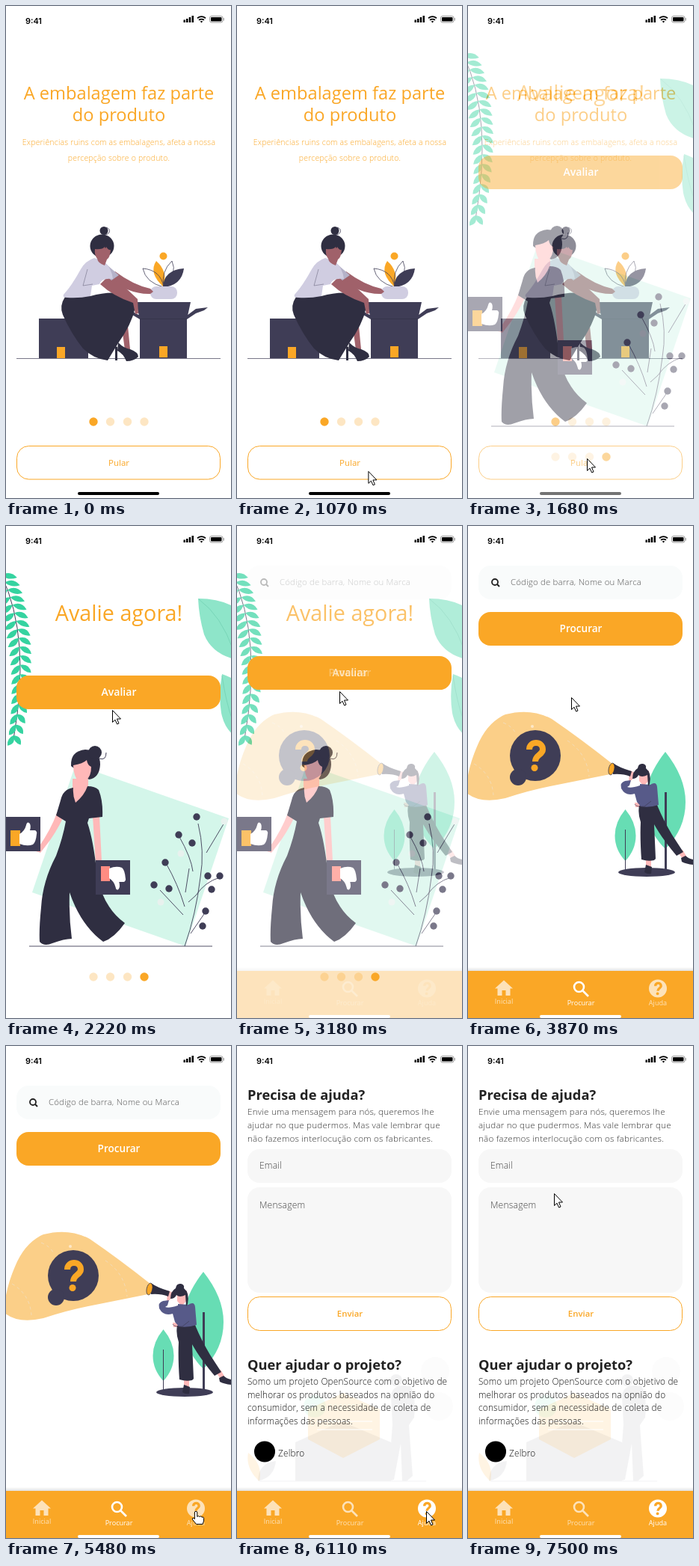
Write an HTML page that moves like this. It is 301 px wide and 658 px high and loops after 8 s.

```html
<!DOCTYPE html>
<html lang="pt">
<head>
<meta charset="utf-8">
<title>Embalagens</title>
<style>
  html, body { margin: 0; width: 100%; height: 100%; overflow: hidden; background: #fff; }
  svg { display: block; width: 100vw; height: 100vh; font-family: "Open Sans", "Noto Sans", sans-serif; }
  .mid { text-anchor: middle; }
  .light { font-weight: 300; letter-spacing: .18px; }
  .head { font-weight: 700; font-size: 18.3px; fill: #222; }
  .orange { fill: #faa726; }
  .dark { fill: #3f3d56; }
  .night { fill: #2f2e41; }
  .lilac { fill: #d0cde1; }
  .brown { fill: #a0616a; }
  .pink { fill: #ffb8b8; }
  .teal { fill: #67ddb4; }
  .line { fill: none; stroke: #3f3d56; }
</style>
</head>
<body>
<svg viewBox="0 0 301 658" preserveAspectRatio="none">
  <defs>
    <path id="thumb" d="M0 10Q7 6 9-2q1-5 4-3 3 3 1 10h7q3 2 2 5-1 11-5 14-8 3-18-1Z" fill="#fff"/>
    <g id="ask" fill="none" stroke-linecap="round">
      <path d="M-8-8C-8-20 10-20 10-8 10-1 0-1 0 8" stroke-width="8" stroke-linecap="butt"/>
      <path d="M-1 16.5h.01" stroke-width="9"/>
    </g>
    <linearGradient id="shade" x2="0" y2="1">
      <stop stop-color="#000" stop-opacity="0"/><stop offset="1" stop-color="#000" stop-opacity=".12"/>
    </linearGradient>
  </defs>

  <g id="intro">
    <g class="orange mid">
      <g font-size="23.65"><text x="151" y="125">A embalagem faz parte</text><text x="151" y="154">do produto</text></g>
      <g class="light" font-size="10.5">
        <text x="151" y="186">Experiências ruins com as embalagens, afeta a nossa</text>
        <text x="151" y="207">percepção sobre o produto.</text>
      </g>
      <text x="151" y="615" font-size="11.5">Pular</text>
    </g>
    <rect x="14.5" y="588.5" width="272" height="44.500" rx="16" fill="none" stroke="#faa726"/>
    <rect x="96" y="650" width="109" height="4" rx="2"/>
    <path class="line" d="M14 471.500H287" stroke-opacity=".7"/>
    <path class="dark" d="M44 418h66v53H44ZM179 418h63v53h-63ZM174 396h73l-5 23h-63ZM152 403l9 1 18 10v5ZM242 414l12-9 16-2-5 4-11 4-12 8Z"/>
    <path d="M179 418.500h63" stroke="#2f2e41" stroke-opacity=".5"/>
    <path class="orange" d="M68 456h11v15H68ZM205 455h11v15h-11Z"/>
    <path class="orange" d="M211 376Q190 357 201 341 217 355 211 376Z"/>
    <path class="dark" d="M210 376Q211 353 238 351 235 374 210 376Z"/>
    <path class="line" stroke-width=".8" d="M211 376Q187 370 183 351 207 353 211 376ZM211 376Q207 355 222 341 230 358 211 376Z"/>
    <rect class="lilac" x="193" y="375" width="36" height="17" rx="8"/>
    <circle class="orange" cx="210.500" cy="334.500" r="5"/>
    <path class="brown" d="M155 430l8-2 3 31-7 1ZM134 362l12-7Q170 373 193 378l4 4-4 3Q164 386 134 362Z"/>
    <path class="night" d="M146 455l3 1v18h-3ZM150 450q8 8 16 9 11 4 11 10-6 6-16 6-4-10-12-14ZM79 389Q95 386 113 388 140 380 164 386 176 392 173 403 168 426 150 451L136 474Q117 472 103 458 87 438 76 413 71 401 79 389Z"/>
    <path class="brown" d="M126 372l9-9q13 4 24 13l17 16 1 19-4 1-3-15Q143 388 126 372Z"/>
    <path d="M128 340l23 20-10 7-14-12Z" fill="#b5b2c9"/>
    <path class="lilac" d="M118 337Q106 341 100 352 88 374 77 386q-2 4 5 4 16 1 31-2l2-14 10-2q3-9 18-7Q141 349 130 341Z"/>
    <path d="M109 352l-6 22 13-2" class="line" stroke-width=".4"/>
    <circle class="night" cx="131" cy="300.500" r="5.500"/>
    <path class="line" stroke-width=".8" d="M134 296q6 2 4 7-2 3-6 3"/>
    <ellipse class="night" cx="128.500" cy="321" rx="16" ry="15.500"/>
    <path class="brown" d="M119 325q10 1 13-3 1 4 2 0 3 5 6 4-1 11-5 13l-3 8q-9-3-10-9-4-5-3-13Z"/>
    <g class="orange"><circle cx="117" cy="556" r="5.700"/>
      <g opacity=".27"><circle cx="139.500" cy="556" r="5.700"/><circle cx="162.500" cy="556" r="5.700"/><circle cx="185" cy="556" r="5.700"/></g></g>
  </g>

  <g id="rate">
    <rect width="301" height="658" fill="#fff"/>
    <text class="mid orange" x="151" y="127" font-size="28.700">Avalie agora!</text>
    <g id="fern" fill="#35d3a0"><path class="line" d="M-6 66Q34 150 10 285"/></g>
    <g fill="#8ee5c9">
      <path d="M257 97q28 0 48 11v70q-30-8-40-33-7-24-8-48ZM289 198q-5 27-1 52 4 20 17 30v-75q-10-5-16-7Z"/>
      <path d="M258 98q30 22 46 68M289 200q5 35 14 60" fill="none" stroke="#6fcfb0" stroke-width=".7"/>
    </g>
    <path class="teal" opacity=".28" d="M35 490L93 319 298 391 240 562Z"/>
    <path class="line" d="M31 562H276M239 562Q254 520 260 470 266 435 257 398M231 414q17 30 19 48M245 458l-5 32M214 451q16 28 25 58M206 487l31 33M267 516l-20 29M286 470q-20 6-32 24l-10 9M292 397l-24 40" stroke-width=".9"/>
    <g class="dark" id="berries"></g>
    <path class="pink" d="M68 384l9 5Q66 412 53 428l-7 9-6-2 4-6Q60 406 68 384ZM116 388h9l3 60q-4 8-8 3ZM89 338h21v16l-17 30-12-30 8-4Z"/>
    <g class="night">
      <path d="M90 350Q76 352 73 367l-6 20 13 8q-4 22-13 46Q49 475 47 510q-3 30-2 46 6 7 17 2 16-6 26-6-4-30-3-62 15 44 45 66 15-5 29-25Q130 510 122 468 117 420 109 397l2-6 18-2q1-21-5-36-5-5-15-5-4 12-16 22-4-10-3-20Z"/>
      <path d="M87 321Q86 301 106 299q20 1 20 20-1 18-15 20Z"/><circle cx="119" cy="303" r="9"/>
    </g>
    <path class="line" d="M125 311q9 3 9-8"/>
    <path class="pink" d="M90 320q13-2 18-7 1 7 6 9 0 13-7 18l-9 4q-8-10-8-24Z"/>
    <path class="dark" d="M0 389h46v46H0ZM120 447h46v46h-46Z"/>
    <path class="orange" d="M6 407h13v21H6Z"/><path d="M127 455h12v20h-12Z" fill="#ff8c82"/>
    <use href="#thumb" x="18" y="402"/><use href="#thumb" transform="translate(138 481) scale(.95 -1)"/>
    <g class="orange"><circle cx="185" cy="603" r="5.700"/>
      <g opacity=".27"><circle cx="117" cy="603" r="5.700"/><circle cx="139.500" cy="603" r="5.700"/><circle cx="162.500" cy="603" r="5.700"/></g></g>
  </g>

  <g id="search">
    <rect width="301" height="658" fill="#fff"/>
    <rect x="14" y="53" width="273" height="45" rx="16" fill="#f9fbfb"/>
    <path d="M39 78l3 3" stroke="#222" stroke-width="2"/><circle cx="36" cy="75" r="4" fill="none" stroke="#222" stroke-width="1.800"/>
    <text class="light" x="57" y="79" font-size="11.400" fill="#555">Código de barra, Nome ou Marca</text>
    <path d="M193 318Q150 284 112 258 84 243 50 252 25 263 12 295-1 325-3 356 15 372 50 364 80 354 110 348L190 332Z" fill="#fbcf88"/>
    <path d="M8 318q24 14 26 42M133 287q26 17 29 48M47 263q12 5 16 13" fill="none" stroke="#f3dcb8" stroke-dasharray="4 4"/>
    <circle cx="86" cy="268" r="2" fill="#fde8c8"/>
    <circle class="dark" cx="90" cy="307" r="34"/><circle class="dark" cx="67" cy="336" r="11"/>
    <use href="#ask" x="90" y="307" stroke="#faa726"/>
    <path class="teal" d="M264 302q27 34 27 67 0 36-27 63-27-27-27-63 0-33 27-67ZM210.500 379q14 17 14 35 0 19-14 34-14-15-14-34 0-18 14-35Z"/>
    <ellipse class="dark" cx="239" cy="463" rx="38" ry="6"/>
    <path class="line" stroke-width="3" d="M264.500 356V461"/><path class="line" d="M210.500 406V461"/>
    <path class="pink" d="M238 444h7v12h-7ZM281 437l6-4 6 10-5 3ZM216 327l6 2-2 10-5 3ZM223 370l14 1v5h-13ZM229 331q10-2 13-4l1 12-8 9-6-7Z"/>
    <path class="night" d="M229 374l24-1q7 18 20 40l15 23-9 5q-20-24-30-42l2 46-2 2q-8 2-17-1-2-29-1-50-4-12-2-22ZM238 453l8 3-1 9q-5 1-9-2ZM285 444l6-3q4 4 10 5v7q-9-1-15-4Z"/>
    <path d="M230 345l14 1q8-5 9 3l2 24q-12 4-24 2l-5-6-3-11q-12 4-18-7-2-8 5-10l8-1-2 7-3 2q5 2 17-2Z" fill="#575a89"/>
    <path d="M223 372q2 4 13 3l9-7" class="line" stroke-width=".7"/>
    <path class="night" d="M220 338q0-10 7-14 1-7 7-6 5 1 4 6 8 6 5 21l-2 3-1-15q-8 4-12 0-2 5-8 5Z"/>
    <path class="night" d="M194 317q8 6 25 11l-2 7q-10-4-23-3Z"/>
    <ellipse class="orange" cx="192" cy="325" rx="3.800" ry="8" transform="rotate(12 192 325)" stroke="#2f2e41" stroke-width=".7"/>
    <g class="bar"></g>
  </g>

  <g id="button">
    <rect class="orange" x="14" width="273" height="45" rx="16"/>
    <g class="mid" fill="#fff" font-weight="600">
      <text id="rateLabel" x="151" y="27" font-size="14">Avaliar</text>
      <text id="searchLabel" x="151" y="27" font-size="13.600">Procurar</text>
    </g>
  </g>

  <g id="help">
    <rect width="301" height="658" fill="#fff"/>
    <g opacity=".055">
      <path class="night" d="M78 530l62-28 66 28v52H78ZM206 470q0-14 14-16l12 1q8 10 5 42l-7 10 5 68-8 7h-6l-2-50-9 48-8 2 6-76Z"/>
      <circle class="night" cx="213" cy="447" r="8"/>
      <circle cx="265" cy="435" r="19" fill="#ccc"/><circle cx="270" cy="482" r="19" fill="#ccc"/>
      <path class="line" d="M30 582H253"/>
      <path class="night" d="M28 582q0-24 24-27-2 22-24 27Z"/>
    </g>
    <circle class="teal" cx="104" cy="482" r="15" opacity=".1"/>
    <path class="orange" opacity=".13" d="M95 486l47-22 49 22v40l-49 25-47-25ZM30 582q-19-17-15-38 20 15 15 38Z"/>
    <path d="M107 502h74M107 513h74" stroke="#fff" stroke-width="2" opacity=".6"/>
    <text class="head" x="14" y="72">Precisa de ajuda?</text>
    <g class="light" font-size="11.700" fill="#333">
      <text x="14" y="92">Envie uma mensagem para nós, queremos lhe</text>
      <text x="14" y="110">ajudar no que pudermos. Mas vale lembrar que</text>
      <text x="14" y="128">não fazemos interlocução com os fabricantes.</text>
    </g>
    <rect x="14" y="138" width="273" height="45" rx="16" fill="#f7f7f7"/>
    <rect x="14" y="189" width="273" height="141" rx="16" fill="#f7f7f7"/>
    <g class="light" font-size="12.100" fill="#444"><text x="30" y="164">Email</text><text x="30" y="217">Mensagem</text></g>
    <rect x="14.5" y="335.500" width="272" height="45" rx="16" fill="#fff" stroke="#faa726"/>
    <text class="mid orange" x="151" y="362" font-size="11.400" font-weight="600">Enviar</text>
    <text class="head" x="14" y="433">Quer ajudar o projeto?</text>
    <g class="light" font-size="11.800" fill="#111">
      <text x="14" y="453">Somo um projeto OpenSource com o objetivo de</text>
      <text x="14" y="471">melhorar os produtos baseados na opnião do</text>
      <text x="14" y="488">consumidor, sem a necessidade de coleta de</text>
      <text x="14" y="506">informações das pessoas.</text>
      <text x="55" y="549">Zelbro</text>
    </g>
    <circle cx="37" cy="542.500" r="14"/>
    <g class="bar"></g>
  </g>

  <g id="status">
    <text x="26" y="23.500" font-size="10.900" font-weight="600" style="font-family:Inter,sans-serif">9:41</text>
    <path d="M237.500 18.500h2.500V22h-2.500ZM241 17h2.500v5H241ZM244.700 15h2.500v7h-2.500ZM248.500 13h2.500v9h-2.500Z"/>
    <path d="M256 16.200q5.500-4 11 0M258 18.800q3.500-2.500 7 0" fill="none" stroke="#000" stroke-width="1.800"/><path d="M259.700 20.500q1.800-1.200 3.600 0L261.500 22.500Z"/>
    <rect x="272.500" y="13.500" width="17.500" height="8.500" rx="2.500" fill="none" stroke="#999"/><rect x="274" y="15" width="14.500" height="5.500" rx="1"/>
    <path d="M291.300 16v3.500" stroke="#999"/>
  </g>

  <g id="cursor" fill="#fff" stroke="#000" stroke-linejoin="round">
    <path id="arrow" d="M.5.500V16.500L4 13.200 6.600 19 9 18 6.500 12H11.500Z"/>
    <path id="hand" d="M-1.700 2a1.700 1.700 0 0 1 3.400 0V7.500l1.500-1 1.600 1 1.700-.6 1.500 1.300 1.500-.3 1 1.600V13L9 17.500H.5L-4.500 11.500q-.8-2.300 1.300-2.300l1.500 1.400Z"/>
  </g>
</svg>
<script>
const $ = id => document.getElementById(id);
const show = (id, opacity) => $(id).setAttribute('opacity', opacity);

// Leaflets in pairs along the curved stem.
for (let i = 0; i < 19; i++) {
  const s = i / 18, r = 1 - s, length = 21 - 5 * s;
  const x = -6 * r * r + 68 * r * s + 10 * s * s;
  const y = 66 * r * r + 300 * r * s + 280 * s * s;
  for (const angle of [8 + 45 * s, 155 - 35 * s])
    $('fern').innerHTML += `<path transform="translate(${x} ${y}) rotate(${angle})" d="M0 0Q${length / 2}-9 ${length} 0 ${length / 2} 6 0 0Z"/>`;
}

const berries = [[255, 389], [231, 413], [249, 424], [213, 450], [198, 480], [218, 485],
  [270, 468], [286, 468], [275, 486], [267, 515], [263, 535]];
$('berries').innerHTML = berries.map(([x, y]) => `<circle cx="${x}" cy="${y}" r="4.700"/>`).join('') +
  [[234, 438], [207, 503], [292, 395]].map(([x, y]) => `<circle cx="${x}" cy="${y}" r="4.500" fill="#e8f1ee"/>`).join('');

function tabBar(active) {
  const tab = (i, x, y, label, icon) => `<g opacity="${i === active ? 1 : .68}">${icon}
    <text class="mid" x="${x}" y="${y}" font-size="9.100" fill="#fff">${label}</text></g>`;
  return `<rect y="590" width="301" height="5" fill="url(#shade)"/><rect class="orange" y="595" width="301" height="63"/><g class="tabs">` +
    tab(0, 48, 639, 'Inicial', '<path fill="#fff" d="M48 607.500l12 11h-3.500v9.500h-6v-7h-5v7h-6v-9.500H36Z"/>') +
    tab(1, 151, 641, 'Procurar', '<g fill="none" stroke="#fff" stroke-width="2.600"><circle cx="148.500" cy="616.500" r="6.500"/><path d="M153 621l8 8"/></g>') +
    tab(2, 254, 641, 'Ajuda', '<circle cx="254" cy="618.500" r="12" fill="#fff"/><use href="#ask" transform="translate(254 618.500) scale(.42)" stroke="#faa726"/>') +
    '</g><rect x="96" y="654" width="109" height="4" rx="2" fill="#fff"/>';
}
document.querySelectorAll('.bar').forEach((bar, i) => bar.innerHTML = tabBar(i + 1));
const searchTabs = document.querySelector('#search .tabs');

const ease = (t, from, to) => {
  const s = Math.min(1, Math.max(0, (t - from) / (to - from)));
  return s * s * (3 - 2 * s);
};

// time, x, y, hand pointer
const stops = [
  [680, 213, 652, 0], [1200, 158, 608, 1], [1520, 159, 605, 0], [1750, 159, 605, 0], [2200, 142, 246, 0],
  [2320, 142, 246, 0], [2390, 133, 218, 1], [2530, 133, 218, 1], [2680, 137, 221, 1], [3000, 137, 221, 0],
  [3250, 137, 221, 0], [3550, 138, 229, 0], [3850, 138, 229, 0], [4620, 252, 600, 0], [4700, 254, 601, 1],
  [4930, 255, 617, 1], [5160, 255, 617, 1], [5250, 255, 622, 1], [5470, 254, 622, 1], [5700, 253, 622, 0],
  [6700, 253, 622, 0], [7450, 115, 197, 0], [8000, 115, 197, 0]
];

function drawCursor(t) {
  show('cursor', t < 680 ? 0 : 1);
  const next = stops.findIndex(stop => stop[0] > t);
  if (next < 1) return;
  const [t0, x0, y0, hand] = stops[next - 1], [t1, x1, y1] = stops[next];
  const s = ease(t, t0, t1);
  $('cursor').setAttribute('transform', `translate(${x0 + (x1 - x0) * s} ${y0 + (y1 - y0) * s})`);
  show('arrow', 1 - hand);
  show('hand', hand);
}

function draw(now) {
  const t = Math.max(0, Math.floor((now % 8000 - 30) / 75) * 75 + 30);
  const toRate = ease(t, 1540, 1840), toSearch = ease(t, 3070, 3370), toHelp = ease(t, 5790, 6090);
  show('rate', toRate);
  show('search', toSearch);
  show('help', toHelp);
  show('button', toRate);
  searchTabs.setAttribute('opacity', toSearch);
  $('button').setAttribute('transform', `translate(0 ${200 - 85 * toSearch})`);
  show('rateLabel', 1 - toSearch);
  show('searchLabel', toSearch);
  drawCursor(t);
  requestAnimationFrame(draw);
}
requestAnimationFrame(draw);
</script>
</body>
</html>
```
